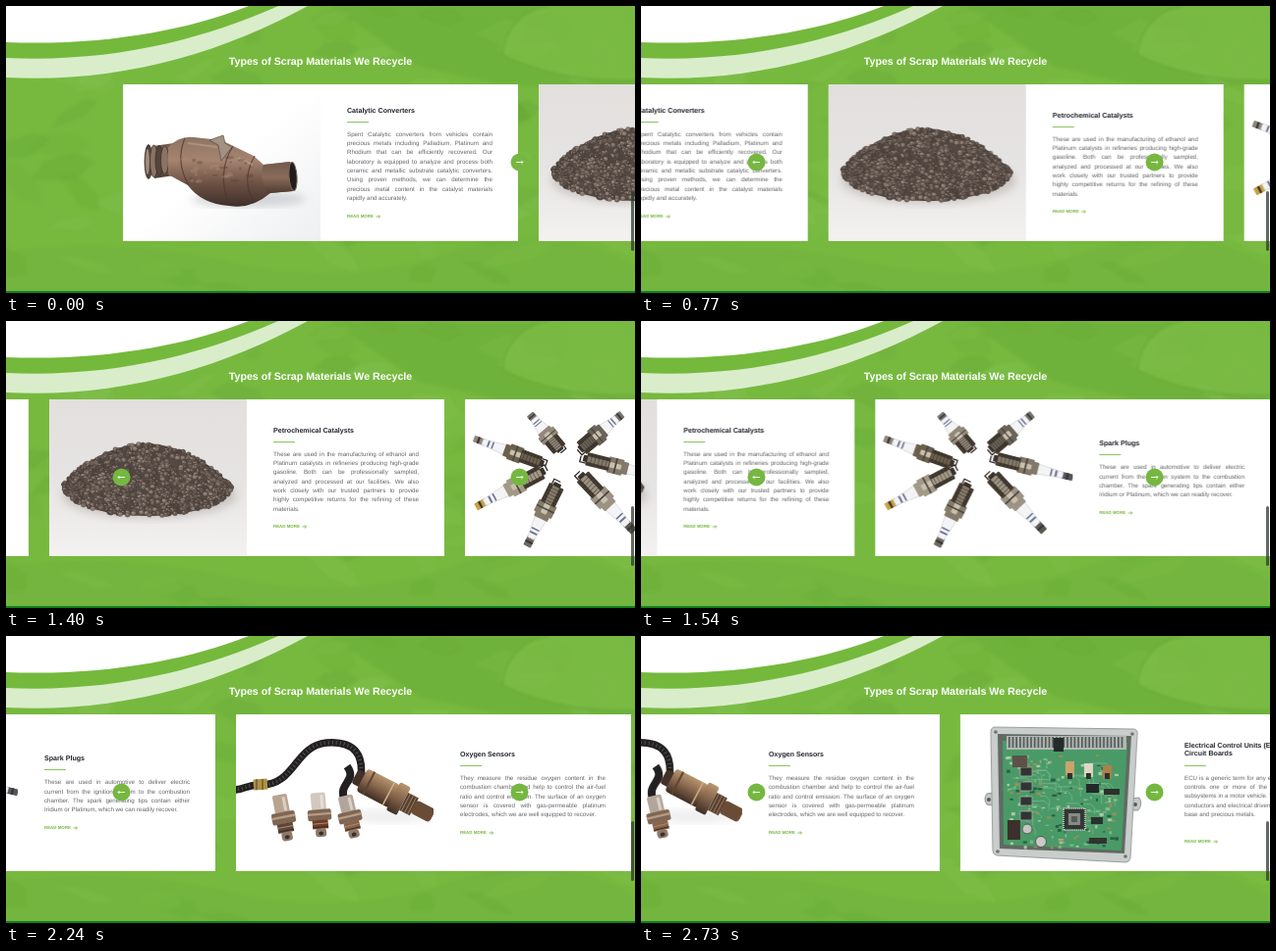
Write an HTML page that moves like this. It is 640 px wide and 293 px high and loops after 2800 ms.

```html
<!DOCTYPE html>
<html lang="en">
<head>
<meta charset="utf-8">
<title>Types of Scrap Materials We Recycle</title>
<style>
  html, body { margin: 0; width: 100%; height: 100%; overflow: hidden; }
  body { position: relative; background: #77b93f; font-family: "Liberation Sans", Arial, sans-serif; text-rendering: geometricPrecision; }
  svg { display: block; position: absolute; }
  #stage { position: absolute; left: 0; top: 0; width: 640px; height: 293px; overflow: hidden; }
  h1 { position: absolute; left: 0; top: 50px; width: 640px; margin: 0; font-size: 10.65px; line-height: 14px; text-align: center; color: #fff; }
  #track { position: absolute; left: 119px; top: 80px; will-change: transform; }
  .card { position: absolute; top: 0; width: 402px; height: 160px; background: #fff; }
  .card > svg { left: 0; top: 0; }
  .copy { position: absolute; left: 228px; width: 148px; white-space: nowrap; }
  h2 { margin: 0; font-size: 7.1px; line-height: 8.4px; color: #20232a; }
  .rule { width: 22px; height: 1px; margin: 6.7px 0 8.2px; background: #8ac35e; }
  .line { font-size: 6.2px; line-height: 9.33px; color: #636569; text-align-last: justify; }
  .line:last-child { text-align-last: left; }
  .more { position: absolute; left: 228px; font-size: 4.4px; line-height: 6px; font-weight: bold; color: #74b63d; white-space: nowrap; }
  .more svg { left: 29px; top: 0; }
  .arrow { top: 150px; }
  #bar { position: absolute; left: 636px; top: 189px; width: 3px; height: 61px; border-radius: 1.5px; background: rgba(45, 55, 45, .75); }
  #foot { position: absolute; left: 0; top: 291px; width: 640px; height: 2px; background: #12801f; }
</style>
</head>
<body>
<div id="stage">
  <svg id="back" width="640" height="293"></svg>
  <h1>Types of Scrap Materials We Recycle</h1>
  <div id="track"></div>
  <svg class="arrow" id="prev" style="left:108px" width="19" height="19"><circle cx="9.5" cy="9.5" r="9" fill="#75b740"/><path d="M13 9.5H6M7.6 7.9L6 9.5l1.6 1.6" fill="none" stroke="#fff" stroke-width=".9"/></svg>
  <svg class="arrow" style="left:512.5px" width="19" height="19"><circle cx="9.5" cy="9.5" r="9" fill="#75b740"/><path d="M6 9.5h7M11.4 7.9L13 9.5l-1.6 1.6" fill="none" stroke="#fff" stroke-width=".9"/></svg>
  <div id="bar"></div>
  <div id="foot"></div>
</div>
<script>
const $ = id => document.getElementById(id);

function random(seed) {
  return () => (seed = (seed * 16807) % 2147483647) / 2147483647;
}
const range = (n, fn) => Array.from({ length: n }, (_, i) => fn(i)).join('');
const rect = (x, y, w, h, fill, more = '') => `<rect x="${x}" y="${y}" width="${w}" height="${h}" fill="${fill}" ${more}/>`;
const disc = (x, y, rx, ry, fill, more = '') => `<ellipse cx="${x}" cy="${y}" rx="${rx}" ry="${ry}" fill="${fill}" ${more}/>`;
const shape = (d, fill, more = '') => `<path d="${d}" fill="${fill}" ${more}/>`;
const line = (d, stroke, width, more = '') => `<path d="${d}" fill="none" stroke="${stroke}" stroke-width="${width}" ${more}/>`;

// Lays a part drawn along the x axis between two points.
function along(x1, y1, x2, y2, draw) {
  const dx = x2 - x1, dy = y2 - y1;
  const turn = Math.atan2(dy, dx) * 180 / Math.PI;
  return `<g transform="translate(${x1} ${y1}) rotate(${turn})">${draw(Math.hypot(dx, dy))}</g>`;
}

function gradient(id, stops, x2 = 0, y2 = 1) {
  return `<linearGradient id="${id}" x2="${x2}" y2="${y2}">` +
    stops.map((c, i) => `<stop offset="${i / (stops.length - 1)}" stop-color="${c}"/>`).join('') +
    '</linearGradient>';
}

function backdrop() {
  const r = random(71);
  const rocks = range(80, () => {
    const w = 12 + r() * 34, h = 5 + r() * 13, turn = r() * 80 - 40;
    return shape(`M${-w} 0L${-w * .4} ${-h}L${w * .6} ${-h * .8}L${w} ${h * .2}L${w * .3} ${h}Z`, r() < .6 ? '#5f9f33' : '#8cc75d',
      `opacity="${.1 + r() * .18}" transform="translate(${r() * 640} ${r() * 300}) rotate(${turn})"`);
  });
  return `<defs><filter id="soft"><feGaussianBlur stdDeviation="1.6"/></filter></defs>
    ${rect(0, 0, 640, 293, '#77b93f')}
    <g filter="url(#soft)">
      ${shape('M330 0H640V84L500 80L420 62Z', '#66a635', 'opacity=".35"')}
      ${rocks}
      ${shape('M505 50C508 20 530 2 552 0H640V76Q560 78 505 50Z', '#7cbc47', 'opacity=".75"')}
      ${line('M552 0C530 2 508 20 505 50Q560 78 640 76', '#5d9c32', 1.5, 'opacity=".5"')}
      ${shape('M0 250Q120 236 230 262T450 252T640 266V293H0Z', '#6aad38', 'opacity=".25"')}
    </g>
    ${shape('M0 0H307C216 50 112 79 0 73Z', '#74b93c')}
    ${shape('M0 53C110 58 200 34 277 0H307C216 50 112 79 0 73Z', '#d9edca')}
    ${shape('M0 0H247C184 25 98 41 0 37Z', '#fff')}`;
}

function converter() {
  const r = random(9);
  return `<defs>${gradient('rust', ['#8f7464', '#a58470', '#6d5144', '#3e302a'])}
      ${gradient('pipe', ['#6f5a4d', '#8a6b59', '#4d3b32'])}
      ${gradient('floor', ['#fff', '#fff', '#eeeff1'], 1, 1)}
      <filter id="blur"><feGaussianBlur stdDeviation="4"/></filter></defs>
    ${rect(0, 0, 201, 160, 'url(#floor)')}
    ${disc(128, 117, 58, 8, '#aeb0b5', 'opacity=".5" filter="url(#blur)"')}
    ${shape('M30 63L52 60V93L32 96Z', 'url(#pipe)')}
    ${range(4, i => disc(26 + i * 5.5, 79 - i * .6, 4, 17.5 - i * 1.1, i % 2 ? '#8a7364' : '#54443b', 'stroke="#382d28" stroke-width=".7"'))}
    ${disc(25, 79, 2, 13, '#a18b7d')}
    ${shape('M46 64Q58 52 72 54L100 57L133 73L143 82L170 79Q179 94 173 109L150 111Q130 128 108 124Q80 122 66 103L46 92Z', 'url(#rust)')}
    ${shape('M143 82L170 79Q179 94 173 109L148 111Q138 98 143 82Z', 'url(#pipe)')}
    ${disc(173, 94, 4, 14.5, '#211d1c', 'stroke="#7b6659" transform="rotate(-4 173 94)"')}
    ${shape('M88 57L102 52L104 60L111 64L100 78L97 62Z', '#a39184', 'stroke="#5c4a40" stroke-width=".7"')}
    ${line('M63 55Q53 79 67 103M112 63Q95 90 108 123M134 73Q120 98 133 119', '#493831', 1.2, 'opacity=".75"')}
    ${line('M66 60L96 64M117 75L132 82', '#c3a995', 2, 'opacity=".5"')}
    ${range(34, () => disc(62 + r() * 70, 70 + r() * 34, 1 + r() * 4, .6 + r() * 1.5, r() < .5 ? '#563f34' : '#b08d76', 'opacity=".35"'))}`;
}

function pellets() {
  const r = random(37), count = 1150, tones = ['#51463f', '#665a53', '#786a61', '#8a7a70', '#5b4f49'];
  const top = u => 87 - 42 * Math.pow(Math.cos(u * Math.PI / 2), .75) + (u > 0 ? 3 * u : 0);
  const low = u => 89 + 30 * Math.sqrt(1 - u * u);
  const steps = Array.from({ length: 41 }, (_, i) => i / 20 - 1);
  const edge = [...steps.map(u => [u, top(u)]), ...steps.reverse().map(u => [u, low(u)])];
  const grains = range(count, i => {
    const u = r() * 2 - 1, v = (i + r()) / count;
    const x = 100 + u * 85, y = top(u) + (low(u) - top(u)) * v;
    return disc(x, y, 2.5, 2.2, tones[Math.floor(r() * 5)], 'stroke="#463c37" stroke-width=".4"') +
      (r() < .6 ? disc(x - .6, y - .8, .9, .7, '#b1a298', 'opacity=".65"') : '');
  });
  return `<defs>${gradient('table', ['#e2dfdd', '#e6e4e2', '#f3f2f1'])}</defs>
    ${rect(0, 0, 201, 160, 'url(#table)')}
    ${disc(102, 98, 89, 24, '#aaa39e', 'opacity=".5" filter="url(#blur)"')}
    ${shape('M' + edge.map(([u, y]) => `${100 + u * 85} ${y}`).join('L') + 'Z', '#544942')}${grains}`;
}

function plug(x1, y1, x2, y2, w, shell, end) {
  return along(x1, y1, x2, y2, n => {
    const part = (a, b, k, fill) => rect(n * a, -w * k / 2, n * (b - a), w * k, fill, 'rx="1"');
    return part(0, .14, .46, end) + part(.05, .08, .46, '#3e3936') +
      shape(`M${n * .12} ${-w * .2}L${n * .46} ${-w * .36}V${w * .36}L${n * .12} ${w * .2}Z`, '#f4f4f6', 'stroke="#cfced2" stroke-width=".6"') +
      part(.19, .215, .46, '#6d7492') + part(.25, .27, .5, '#6d7492') +
      part(.42, .5, .85, shell) + part(.48, .66, 1.1, shell) + part(.5, .65, .35, '#c9bfae') + part(.56, .58, 1.1, '#4b443c') +
      part(.64, .92, .9, '#443b32') + part(.65, .91, .4, shell) +
      range(5, i => rect(n * (.68 + i * .045), -w * .42, .7, w * .84, '#2f2822', 'opacity=".6"')) +
      part(.91, .96, .45, '#39322c') + line(`M${n * .92} ${-w * .3}H${n * .99}V${w * .1}`, '#2f2925', 1.3);
  });
}

function plugs() {
  return rect(0, 0, 201, 160, '#fff') +
    plug(66, 15, 99, 54, 18, '#91887a', '#77736d') +
    plug(160, 15, 115, 53, 18, '#6a6358', '#77736d') +
    plug(201, 80, 117, 59, 15, '#82796a', '#55565c') +
    plug(9, 40, 83, 67, 15, '#6b604c', '#8e877c') +
    plug(11, 110, 84, 71, 17, '#a39987', '#c8a343') +
    plug(63, 150, 96, 83, 18, '#857b69', '#6f6962') +
    plug(172, 135, 115, 74, 18, '#9c9384', '#5f5954');
}

function sensor(x1, y1, x2, y2, top, tip) {
  return along(x1, y1, x2, y2, n =>
    rect(0, -7.5, n * .42, 15, top, 'rx="2"') + rect(n * .06, -5, n * .3, 3, '#f4efe9', 'opacity=".6"') +
    rect(n * .38, -12, n * .25, 24, '#806653', 'rx="2"') + rect(n * .46, -12, n * .05, 24, '#b79c85') +
    rect(n * .62, -8, n * .2, 16, tip) + rect(n * .69, -8, 1, 16, '#a88a77') + rect(n * .77, -8, 1, 16, '#3c2c24') +
    rect(n * .81, -5.5, n * .19, 11, '#8d7968', 'rx="3"') + disc(n * .92, 0, 2, 2.5, '#3a302b'));
}

function sensors() {
  const cable = 'M-2 77C8 77 12 71 26 72C60 72 60 32 92 29C122 27 130 42 127 66';
  return `<defs>${gradient('bronze', ['#b8956f', '#84634a', '#3f2e23'])}</defs>
    ${rect(0, 0, 201, 160, '#fff')}
    ${disc(154, 104, 45, 7, '#d5d5d8', 'opacity=".4" filter="url(#blur)"')}
    ${line(cable, '#211f20', 7.5)}${line(cable, '#56514f', 4, 'stroke-dasharray="1 3"')}
    ${line('M18 72l14-1', '#ae9246', 11)}${line('M21 66v11M27 66v11', '#544321', 1)}
    ${line('M110 86C104 70 124 68 113 53', '#232021', 8)}
    ${along(121, 63, 200, 104, n => rect(0, -8, 14, 16, '#413127', 'rx="3"') +
      rect(8, -13, 38, 26, 'url(#bronze)', 'rx="4"') + rect(15, -13, 2, 26, '#5f442f') + rect(38, -13, 1.5, 26, '#d0b08a') +
      rect(44, -16, 12, 32, 'url(#bronze)', 'rx="2"') + rect(56, -10, 12, 20, '#55402f') +
      range(3, i => rect(58 + i * 3.5, -10, 1, 20, '#9a7b5d')) + rect(67, -7.5, n - 67, 15, '#6a4b35', 'rx="4"'))}
    ${sensor(44, 82, 53, 129, '#b9a48f', '#5e4637')}
    ${sensor(83, 80, 87, 125, '#d2c8bd', '#6e3d27')}
    ${sensor(111, 83, 121, 126, '#b2a69b', '#86634a')}`;
}

function board() {
  const r = random(23);
  const bits = range(170, () => rect(46 + r() * 114, 41 + r() * 94, 1 + r() * 4, 1 + r() * 2.5,
    ['#1f4a38', '#cdd8bd', '#8fc29a', '#a69152'][Math.floor(r() * 4)], 'opacity=".75"'));
  const traces = range(30, () => line(`M${48 + r() * 90} ${44 + r() * 80}h${5 + r() * 18}l4 4v${2 + r() * 8}`, '#8fc9a0', .5));
  return rect(0, 0, 201, 160, '#fff') +
    shape('M35 80L27 81Q23 86 27 92L35 93ZM174 86L182 85Q186 91 181 98L173 98Z', '#c3c7c6', 'stroke="#8d9291"') +
    disc(29, 87, 2, 2, '#555') + disc(178, 92, 2, 2, '#555') +
    shape('M34 13L177 15Q181 16 180 21L173 147Q172 151 168 151L37 144Q33 143 33 139L31 18Q31 14 34 13Z', '#c9cdcb', 'stroke="#9a9f9d"') +
    shape('M38 20L174 22L167 142L40 137Z', '#5f6a62') + shape('M43 27L170 29L164 139L44 133Z', '#4a9a68') +
    traces + bits +
    rect(47, 22, 122, 14, '#b3b8b4') + range(32, i => rect(49 + i * 3.7, 23, 1.6, 11, '#4b5350')) +
    rect(95, 24, 10, 14, '#252a2b') +
    range(4, i => rect(61, 54 + i * 15, 12, 9, '#303534', 'stroke="#a8b1a5" stroke-width=".8"')) +
    range(3, i => rect(107 + i * 19, 48 + i * 2, 9, 14, ['#c9a46b', '#ddd8c5', '#ad8049'][i]) + rect(109 + i * 19, 60, 5, 6, '#2d302c')) +
    rect(53, 42, 15, 12, '#5d5147') + rect(128, 71, 13, 9, '#222a28') + rect(146, 76, 16, 6, '#2a302e') +
    rect(105, 96, 22, 22, '#303735', 'stroke="#c2c9bd" stroke-width="1.8" stroke-dasharray="1 1"') + rect(110, 101, 12, 12, '#868c85') + rect(113, 104, 6, 6, '#555b57') +
    rect(48, 108, 13, 20, '#3b302b') + disc(68, 117, 5, 5, '#c4c7c0', 'stroke="#555"') + disc(82, 130, 5.5, 5.5, '#c9cbc5', 'stroke="#555"') +
    rect(133, 105, 12, 7, '#29302e') + rect(131, 126, 18, 6, '#30332f') +
    [[36, 18], [175, 20], [168, 145], [38, 140]].map(([x, y]) => disc(x, y, 1.8, 1.8, '#6b716f')).join('');
}

const cards = [
  { art: converter, head: 'Catalytic Converters', top: 22.5, more: 131.5, text:
    'Spent Catalytic converters from vehicles contain|precious metals including Palladium, Platinum and|Rhodium that can be efficiently recovered. Our|laboratory is equipped to analyze and process both|ceramic and metallic substrate catalytic converters.|Using proven methods, we can determine the|precious metal content in the catalyst materials|rapidly and accurately.' },
  { art: pellets, head: 'Petrochemical Catalysts', top: 27.5, more: 127.3, text:
    'These are used in the manufacturing of ethanol and|Platinum catalysts in refineries producing high-grade|gasoline. Both can be professionally sampled,|analyzed and processed at our facilities. We also|work closely with our trusted partners to provide|highly competitive returns for the refining of these|materials.' },
  { art: plugs, head: 'Spark Plugs', top: 41.2, more: 113, text:
    'These are used in automotive to deliver electric|current from the ignition system to the combustion|chamber. The spark generating tips contain either|Iridium or Platinum, which we can readily recover.' },
  { art: sensors, head: 'Oxygen Sensors', top: 36.8, more: 118, text:
    'They measure the residue oxygen content in the|combustion chamber and help to control the air-fuel|ratio and control emission. The surface of an oxygen|sensor is covered with gas-permeable platinum|electrodes, which we are well equipped to recover.' },
  { art: board, head: 'Electrical Control Units (ECUs) &amp;<br>Circuit Boards', top: 28, more: 127, text:
    'ECU is a generic term for any embedded system that|controls one or more of the electrical systems or|subsystems in a motor vehicle. The boards hold semi-|conductors and electrical driven parts that carry some|base and precious metals.' }
];

const pitch = 423, loop = 2800, tick = 70, slide = 500;
const starts = [505, 1327, 2023, 2580];

$('back').innerHTML = backdrop();
$('track').innerHTML = cards.map((c, i) => `
  <div class="card" style="left:${i * pitch}px">
    <svg width="201" height="160">${c.art()}</svg>
    <div class="copy" style="top:${c.top}px"><h2>${c.head}</h2><div class="rule"></div>
      <div>${c.text.split('|').map(t => `<div class="line">${t}</div>`).join('')}</div></div>
    <div class="more" style="top:${c.more}px">READ MORE<svg width="6" height="6"><path d="M.5 3h4M2.8 1.3l1.7 1.7-1.7 1.7" fill="none" stroke="#74b63d" stroke-width=".8"/></svg></div>
  </div>`).join('');

// The last slide is cut off by the loop, so the track's clock runs past its end.
const span = starts[3] + slide;
const shift = n => `translateX(${-n * pitch}px)`;
const frames = [{ offset: 0, transform: shift(0) }];
starts.forEach((t, i) => frames.push(
  { offset: t / span, transform: shift(i), easing: 'ease' },
  { offset: (t + slide) / span, transform: shift(i + 1) }
));

const move = $('track').animate(frames, { duration: span, fill: 'both' });
move.pause();

const begin = performance.now();
function draw() {
  const t = Math.floor((performance.now() - begin + 8) / tick) * tick % loop;
  move.currentTime = t;
  $('prev').style.visibility = t < starts[0] ? 'hidden' : 'visible';
  requestAnimationFrame(draw);
}
draw();
</script>
</body>
</html>
```
